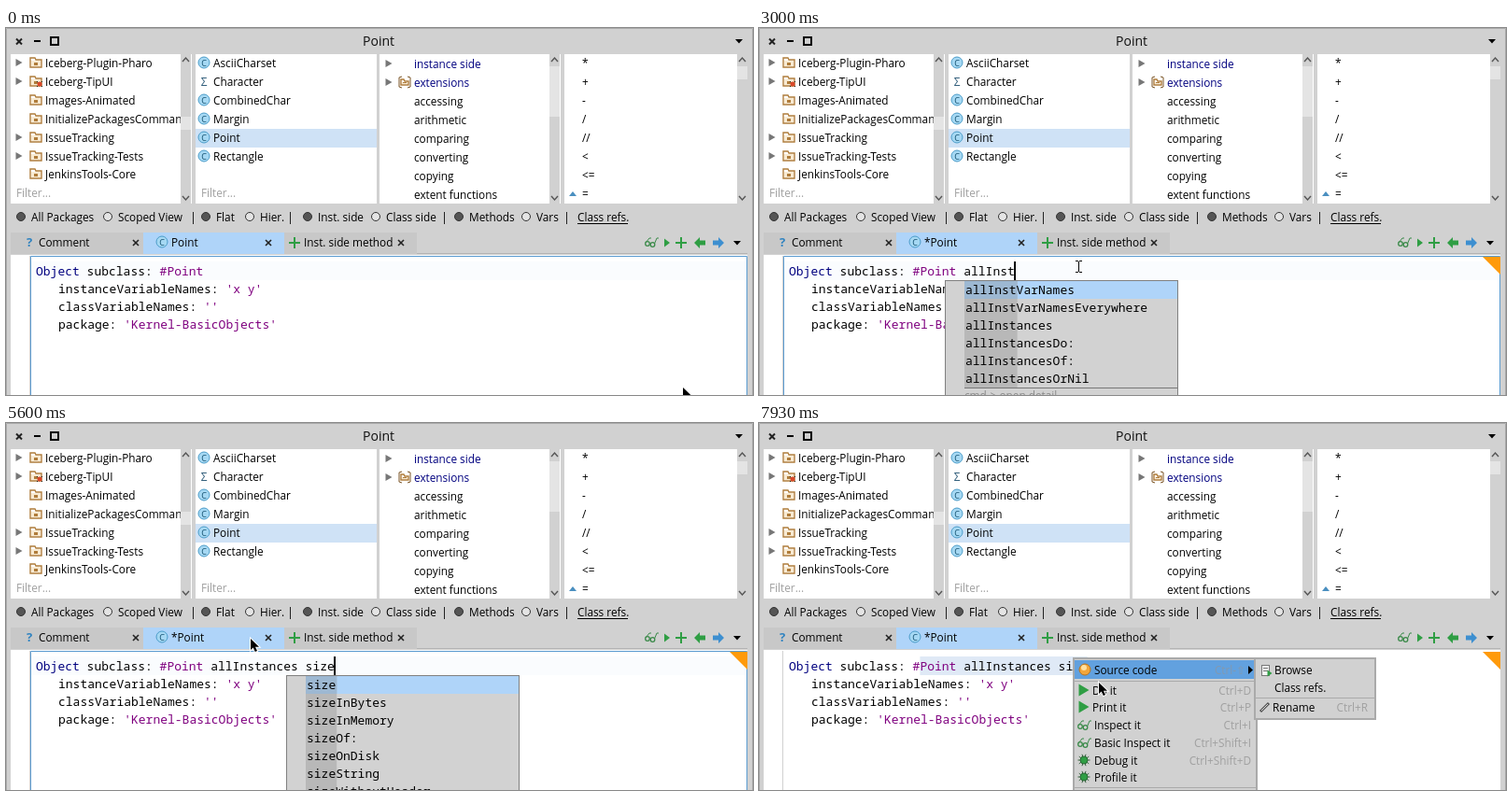
An HTML page with a canvas for the animation above (8000 ms loop, 800x393 px).

```html
<!DOCTYPE html>
<html lang="en">
<head>
<meta charset="utf-8">
<title>Class browser</title>
<style>
  html, body { margin: 0; width: 100%; height: 100%; overflow: hidden; background: #d1d1d1; }
  canvas { display: block; }
</style>
</head>
<body>
<canvas id="stage" width="800" height="393"></canvas>
<script>
const ctx = document.getElementById('stage').getContext('2d', { alpha: false });
const LOOP = 8000, STEP = 1000 / 15, CHAR = 7.8;
const UI = '11.8px "Open Sans", sans-serif';
const CODE = '13px "Noto Sans Mono", monospace';
const GRAY = '#d1d1d1', BLUE = '#afd4f9', NAVY = '#00007f', PURPLE = '#7f007f', GREEN = '#2f9e44', FAINT = '#a0a0a0';

// Drawing helpers
function box(x, y, w, h, color) { ctx.fillStyle = color; ctx.fillRect(x, y, w, h); }
function frame(x, y, w, h, color) {
  ctx.strokeStyle = color; ctx.lineWidth = 1;
  ctx.strokeRect(x + .5, y + .5, w - 1, h - 1);
}
function text(str, x, y, color = '#000', font = UI, align = 'left') {
  ctx.font = font; ctx.textAlign = align; ctx.fillStyle = color;
  ctx.fillText(str, x, y);
}
function poly(points, color) {
  ctx.beginPath();
  points.forEach(([x, y]) => ctx.lineTo(x, y));
  ctx.closePath(); ctx.fillStyle = color; ctx.fill();
}
function line(points, color, width = 1) {
  ctx.beginPath();
  points.forEach(([x, y], i) => i ? ctx.lineTo(x, y) : ctx.moveTo(x, y));
  ctx.strokeStyle = color; ctx.lineWidth = width; ctx.stroke();
}
function disc(x, y, r, fill, stroke, width = 1) {
  ctx.beginPath(); ctx.arc(x, y, r, 0, 7);
  if (fill) { ctx.fillStyle = fill; ctx.fill(); }
  if (stroke) { ctx.strokeStyle = stroke; ctx.lineWidth = width; ctx.stroke(); }
}

// Icons, placed by their centre
function cross(x, y, r, width) {
  line([[x - r, y - r], [x + r, y + r]], '#222', width);
  line([[x - r, y + r], [x + r, y - r]], '#222', width);
}
function plus(x, y) { box(x - 6, y - 1, 12, 2, GREEN); box(x - 1, y - 6, 2, 12, GREEN); }
function down(x, y) { poly([[x - 4, y - 2], [x + 4, y - 2], [x, y + 2.5]], '#000'); }
function right(x, y, w, h, color) { poly([[x - w / 2, y - h / 2], [x + w / 2, y], [x - w / 2, y + h / 2]], color); }
function arrow(x, y, dir, color) {
  poly([[-6, 0], [0, -6], [0, -2.5], [6, -2.5], [6, 2.5], [0, 2.5], [0, 6]].map(([a, b]) => [x + a * dir, y + b]), color);
}
function folder(x, y, r = 6) {
  line([[x - r, y + r - 1], [x - r, y + 1 - r], [x - 1, y + 1 - r], [x, y + 3 - r], [x + r, y + 3 - r],
    [x + r, y + r - 1], [x - r - .7, y + r - 1]], '#b07d3c', 1.4);
  box(x - r + 1, y + 4 - r, 2 * r - 2, 2 * r - 6, '#f8ead2');
  box(x - 2, y, 4, r - 3, '#b07d3c');
}
function classIcon(x, y) {
  disc(x, y, 6, '#a5d8f3', '#4a9cc9');
  text('C', x, y + 3.5, '#14506f', '9px "Open Sans", sans-serif', 'center');
}
function glasses(x, y) {
  disc(x - 4, y + 2, 2.3, null, '#3b8a4a', 1.3);
  disc(x + 1.5, y + 3, 2.3, null, '#3b8a4a', 1.3);
  line([[x - 6, y + 1], [x - 2, y - 4], [x, y - 4]], '#3b8a4a');
  line([[x + 3.5, y + 2], [x + 6, y - 4], [x + 8, y - 4]], '#3b8a4a');
}
function bug(x, y) {
  for (let a = 0; a < Math.PI; a += Math.PI / 5) {
    const dx = 6.5 * Math.cos(a), dy = 6.5 * Math.sin(a);
    line([[x - dx, y - dy], [x + dx, y + dy]], '#355e3b');
  }
  disc(x, y, 4, GREEN, '#2c6b38');
}

function scrollbar(x, thumbY, thumbH) {
  box(x, 28, 11, 160, GRAY);
  box(x, thumbY, 11, thumbH, '#e4e4e4');
  line([[x + 2, 36], [x + 5.5, 32], [x + 9, 36]], '#555', 1.4);
  line([[x + 2, 180], [x + 5.5, 184], [x + 9, 180]], '#555', 1.4);
}

const packages = ['Iceberg-Plugin-Pharo', 'Iceberg-TipUI', 'Images-Animated', 'InitializePackagesCommands',
  'IssueTracking', 'IssueTracking-Tests', 'JenkinsTools-Core'];
const classes = ['AsciiCharset', 'Character', 'CombinedChar', 'Margin', 'Point', 'Rectangle'];
const protocols = ['instance side', 'extensions', 'accessing', 'arithmetic', 'comparing', 'converting', 'copying', 'extent functions'];
const methods = ['*', '+', '-', '/', '//', '<', '<=', '='];
const options = [[16, 'All Packages', 1], [109, 'Scoped View', 0], [214, 'Flat', 1], [261, 'Hier.', 0],
  [323, 'Inst. side', 1], [396, 'Class side', 0], [485, 'Methods', 1], [557, 'Vars', 0]];

function drawBrowser() {
  box(0, 0, 800, 393, GRAY);
  line([[.5, 393], [.5, .5], [799.5, .5], [799.5, 393]], '#aaa');
  cross(14, 14.5, 3, 2);
  box(30, 13, 7, 2, '#000');
  ctx.strokeStyle = '#000'; ctx.lineWidth = 2; ctx.strokeRect(48, 10, 8, 8);
  text('Point', 399, 19, '#111', '14px "Open Sans", sans-serif', 'center');
  down(785, 14);

  [5, 203, 400, 598].forEach(x => box(x, 28, 194, 160, '#fff'));

  ctx.save();
  ctx.beginPath(); ctx.rect(5, 28, 182, 160); ctx.clip();
  packages.forEach((name, i) => {
    const y = i < 6 ? 37 + i * 20 : 156;
    if ([0, 1, 4, 5].includes(i)) right(14, y, 7, 8, '#777');
    folder(32, y);
    if (i === 1) { cross(36, y + 3, 3, 1); disc(36, y + 3, 2.5, '#d9482b'); }
    text(name, 42, y + 5);
  });
  ctx.restore();
  scrollbar(187, 95, 14);

  box(203, 108, 194, 20, '#cfe2f6');
  classes.forEach((name, i) => {
    const y = 37 + i * 20;
    if (i === 1) text('Σ', 212, y + 5, '#2c5a78', UI, 'center'); else classIcon(212, y);
    text(name, 222, y + 5);
  });
  text('Filter...', 11, 181, FAINT);
  text('Filter...', 209, 181, FAINT);

  protocols.forEach((name, i) => {
    const y = 38 + i * 20;
    if (i < 2) right(410, y, 7, 8, '#777');
    text(name, 437, y + 5, i < 2 ? NAVY : '#000');
  });
  folder(427, 58, 4);
  line([[424, 52], [421, 53], [421, 63], [424, 64]], '#7a5526');
  line([[430, 52], [433, 53], [433, 63], [430, 64]], '#7a5526');
  scrollbar(582, 41, 54);

  methods.forEach((name, i) => text(name, 617, 42 + i * 20));
  poly([[603, 180], [607, 175], [611, 180]], '#4a8fc0');
  scrollbar(783, 41, 14);

  options.forEach(([x, label, on]) => {
    disc(x, 202, 4.5, on ? '#555' : '#e4e4e4', '#333');
    text(label, x + 11, 207);
  });
  [200, 304, 469, 600].forEach(x => box(x, 197, 1, 13, '#222'));
  text('Class refs.', 612, 207);
  box(612, 209, 54, 1, '#000');
}

function drawTabs(dirty) {
  box(5, 219, 435, 23, '#c8c8c8');
  box(147, 219, 151, 23, BLUE);
  box(440, 241, 354, 1, '#b4b4b4');
  text('?', 25, 234, '#2f83c0', 'bold 13px "Open Sans", sans-serif', 'center');
  text('Comment', 35, 234);
  classIcon(167, 229);
  text(dirty ? '*Point' : 'Point', 177, 234);
  plus(309, 230);
  text('Inst. side method', 319, 234);
  [139, 281, 423].forEach(x => cross(x, 230, 3, 1.6));
  glasses(691, 229);
  right(708, 230, 6, 9, GREEN);
  plus(723, 230);
  arrow(743, 230, 1, GREEN);
  arrow(763, 230, -1, '#3d8fd0');
  down(783, 230);
}

// Typing: how many characters stand at each time
const typed = ' allInstances size';
const typing = [[0, 0], [1470, 1], [1800, 2], [1930, 3], [2070, 4], [2470, 5], [2730, 7], [3000, 8],
  [3200, 10], [3330, 12], [3470, 13], [3870, 14], [4400, 16], [4670, 17], [4800, 18]];

function code(parts, x, y) {
  for (const [str, color] of parts) {
    text(str, x, y, color, CODE);
    x += str.length * CHAR;
  }
}

function drawEditor(t, count, mouse) {
  const menuOpen = t >= 7670, dragging = t >= 6330;
  box(5, 243, 789, 150, '#fff');
  box(25, 244, 1, 149, GRAY);
  if (!menuOpen) {
    if (!dragging) box(27, 250, 766, 20, '#fafcfe');
    line([[26.5, 393], [26.5, 244.5], [793.5, 244.5], [793.5, 393]], '#5b9bd0');
  }
  const end = 32 + (23 + count) * CHAR;
  let caret = t < 870 ? 32 : end;
  if (dragging) {
    const start = 32 + 18 * CHAR;
    if (t < 6870) caret = Math.min(end, 32 + Math.round((mouse.x - 32) / CHAR) * CHAR);
    box(start, 250, caret - start, 20, menuOpen ? '#dfe9f6' : BLUE);
  }
  code([['Object', NAVY], [' subclass: ', '#000'], ['#Point', PURPLE], [typed.slice(0, count), '#000']], 32, 265);
  code([['instanceVariableNames: ', '#000'], ["'x y'", PURPLE]], 56, 284);
  code([['classVariableNames: ', '#000'], ["''", PURPLE]], 56, 303);
  code([['package: ', '#000'], ["'Kernel-BasicObjects'", PURPLE]], 56, 322);
  if (t >= 70 && !menuOpen) box(Math.floor(caret), 250, 2, 20, '#000');
  if (count) poly([[775, 245], [794, 245], [794, 264]], '#ff9a0a');
}

const instances = ['allInstances', 'allInstancesDo:', 'allInstancesOf:', 'allInstancesOrNil'];
const slots = ['allInstVarNames', 'allInstVarNamesEverywhere'];
const completions = [
  [2400, 2530, 199, ['all', 'allAccesses', 'allActions', 'allActionsForPragmas:', 'allActionsWithShortcuts', 'allAdapters', 'allAfterAreWeak']],
  [2530, 3000, 199, ['allImplementors', 'allImplementorsOf:', ...slots, ...instances]],
  [3000, 3470, 199, [...slots, ...instances]],
  [3470, 3870, 199, instances],
  [5130, 6070, 300, ['size', 'sizeInBytes', 'sizeInMemory', 'sizeOf:', 'sizeOnDisk', 'sizeString', 'sizeWithoutHeader']]
];

function drawCompletion(t, count) {
  const open = completions.find(([from, to]) => t >= from && t < to);
  if (!open) return;
  const [, , x, items] = open, rows = items.length;
  const prefix = (x === 199 ? count - 1 : 4) * CHAR + 2;
  box(x, 270, 250, rows * 19 + 19, '#d2d2d2');
  box(x + 21, 271, 228, 19, BLUE);
  box(x + 21, 271, prefix, rows * 19, '#b8b8b8');
  box(x + 21, 271, prefix, 19, '#9db8d2');
  frame(x, 270, 250, rows * 19 + 19, '#808080');
  items.forEach((item, i) => text(item, x + 22, 285 + i * 19, '#000', CODE));
  box(x + 21, 271 + rows * 19, 228, 1, '#777');
  text('cmd-> open detail', x + 21, 284 + rows * 19, '#8a8a8a');
}

function menuBox(x, y, w, h) {
  box(x, y, w, h, GRAY);
  frame(x, y, w, h, '#aaa');
  frame(x + 1, y + 1, w - 2, h - 2, '#aaa');
}

const play = (x, y) => right(x, y, 11, 13, GREEN);
const actions = [['Do it', 'Ctrl+D', play, 286], ['Print it', 'Ctrl+P', play, 304], ['Inspect it', 'Ctrl+I', glasses, 323],
  ['Basic Inspect it', 'Ctrl+Shift+I', glasses, 342], ['Debug it', 'Ctrl+Shift+D', bug, 361], ['Profile it', '', bug, 379]];

function drawContextMenu(hover) {
  menuBox(336, 251, 198, 150);
  if (hover) box(338, 254, 194, 20, '#62a1df');
  disc(349, 264, 6, '#f3a63b', '#b8741c');
  disc(348, 262, 3, '#ffe0a0');
  text('Source code', 359, 269);
  text('Ctrl-⇧', 521, 269, hover ? '#8299b0' : FAINT, UI, 'right');
  right(526.5, 264.5, 5, 9, '#000');
  box(338, 276, 194, 1, '#aaa');
  actions.forEach(([label, keys, icon, y]) => {
    icon(348, y);
    text(label, 357 + (y > 310 ? 2 : 0), y + 4.5);
    text(keys, 527, y + 4.5, FAINT, UI, 'right');
  });
  box(338, 390, 194, 1, '#aaa');
  if (!hover) return;
  menuBox(530, 251, 131, 67);
  box(538, 259, 9, 12, '#f4f4f4'); frame(538, 259, 9, 12, '#777');
  box(540, 262, 5, 1, '#777'); box(540, 265, 5, 1, '#777');
  right(547, 268, 5, 7, GREEN);
  text('Browse', 552, 269);
  text('Class refs.', 552, 288);
  box(532, 294, 127, 1, '#aaa');
  line([[537, 309], [546, 300]], '#555', 3);
  line([[538, 308], [545, 301]], '#ddd', 1);
  text('Rename', 550, 309);
  text('Ctrl+R', 652, 309, FAINT, UI, 'right');
}

const path = [[0, 725, 385], [1, 725, 385], [730, 342, 254], [1066, 342, 254], [1130, 342, 255], [5330, 342, 255], [5600, 262, 231],
  [5930, 169, 254], [6200, 173, 256], [6330, 173, 256], [6860, 368, 268], [6990, 367, 262], [7200, 367, 262],
  [7520, 338, 258], [7660, 338, 258], [7920, 364, 278], [8000, 364, 278]];

function mouseAt(t) {
  const i = path.findIndex(p => p[0] > t);
  const [t0, x0, y0] = path[i - 1], [t1, x1, y1] = path[i];
  const u = (t - t0) / (t1 - t0), k = u * u * (3 - 2 * u);
  return { x: Math.round(x0 + (x1 - x0) * k), y: Math.round(y0 + (y1 - y0) * k) };
}

function drawPointer(t, { x, y }) {
  if (t >= 70 && t < 7670 && y > 246) {
    box(x, y - 5, 1, 11, '#000');
    for (const dy of [-6, 6]) { box(x - 3, y + dy, 3, 1, '#000'); box(x + 1, y + dy, 3, 1, '#000'); }
    return;
  }
  const shape = [[0, 0], [0, 12], [2.7, 9.5], [4.8, 14], [7, 13], [5, 8.7], [9, 8.7]].map(([a, b]) => [x + a, y + b]);
  line([...shape, shape[0], shape[1]], '#fff', 2);
  poly(shape, '#000');
}

function draw(t) {
  const count = typing.findLast(([at]) => t >= at)[1];
  const mouse = mouseAt(Math.min(LOOP - 1, Math.floor(t / STEP + .1) * STEP));
  drawBrowser();
  drawTabs(count > 0);
  drawEditor(t, count, mouse);
  drawCompletion(t, count);
  if (t >= 7670) drawContextMenu(t >= 7800);
  drawPointer(t, mouse);
}

function tick() {
  draw(performance.now() % LOOP);
  requestAnimationFrame(tick);
}
tick();
</script>
</body>
</html>
```
